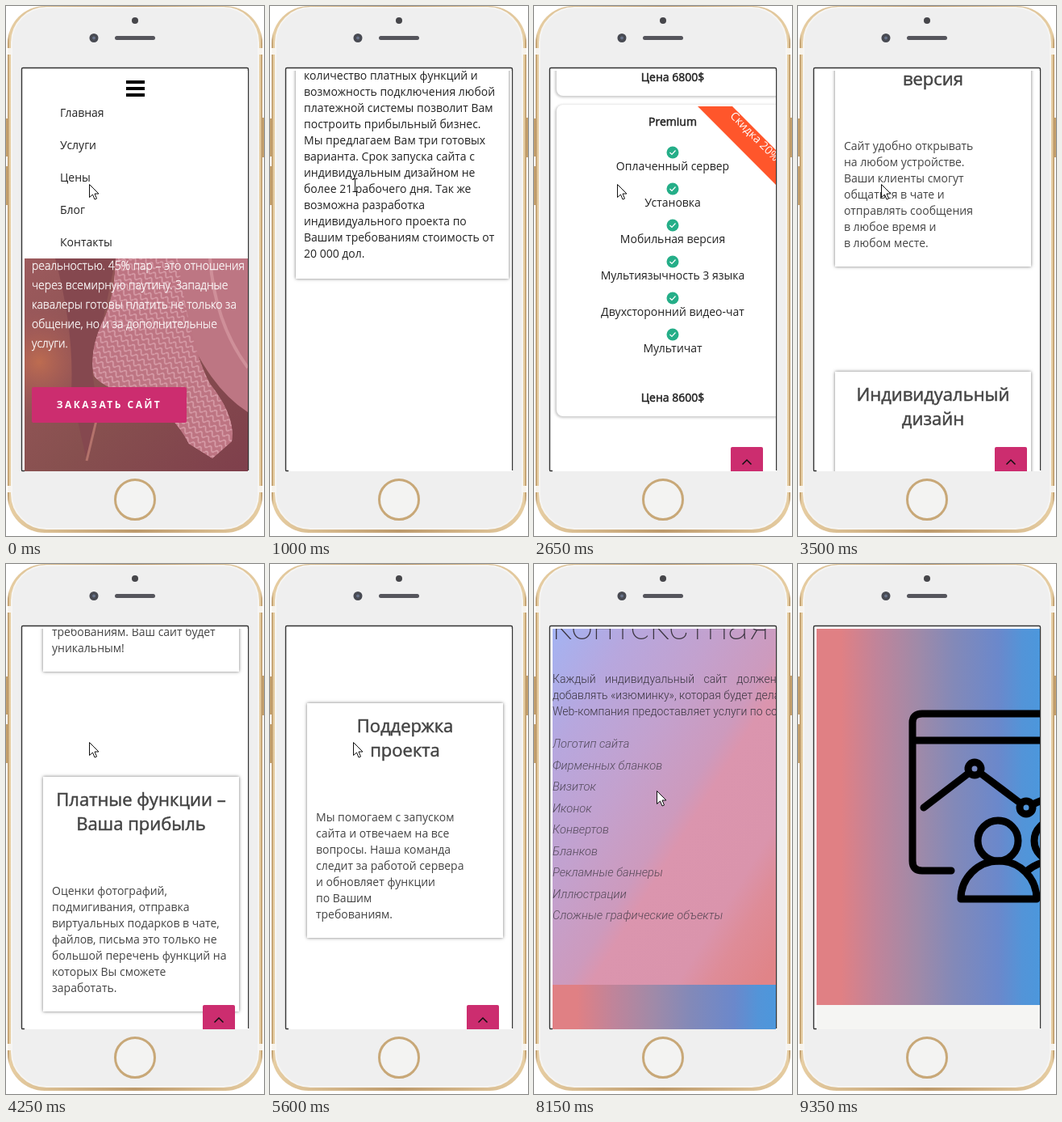
Animation of 320x655 px, one loop 9400 ms. Source, as an HTML page:

```html
<!DOCTYPE html>
<html lang="ru">
<head>
<meta charset="utf-8">
<style>
html, body { margin: 0; width: 100%; height: 100%; overflow: hidden; background: #fff; }
#stage { position: relative; width: 320px; height: 655px; overflow: hidden; }
#stage > svg { position: absolute; left: 0; top: 0; }
#screen { position: absolute; left: 23px; top: 80px; width: 277px; height: 495px; overflow: hidden; background: #fff; }
#screen div, #screen svg { position: absolute; }
.page { left: 0; top: 0; width: 277px; height: 5000px; font: 14px/20px "Open Sans", sans-serif; color: #222; }
.text { white-space: pre; }
.center { left: 0; width: 298px; text-align: center; }
.strong { -webkit-text-stroke: .5px; }
.hero { left: 9px; top: 229px; color: #fff; font-weight: 300; line-height: 24px; -webkit-text-stroke: .3px; }
.button { background: #cc2d6f; color: #fff; border-radius: 2px; text-align: center; }
.order { left: 9px; top: 391px; width: 192px; height: 44px; font: 700 12px/44px "Open Sans", sans-serif; letter-spacing: 2.5px; }
.box { background: #fff; box-shadow: 0 0 4px rgba(0,0,0,.55); }
.card { left: 5px; width: 288px; height: 385px; background: #fff; border-radius: 8px; box-shadow: -1px 1px 3px 1px #ccc; }
.card .center { left: -5px; }
.title { font-size: 22px; line-height: 30px; color: #444; }
.ribbon { left: 206px; top: 29px; width: 80px; text-align: center; color: #fff; transform: rotate(45deg); white-space: nowrap; }
.wide { left: 0; width: 277px; overflow: hidden; }
.cover { background: linear-gradient(122deg, #e0c4ff, #c8a6fa 262px, #a98af8 390px, #826cf8 490px); box-shadow: 0 1px 5px rgba(0,0,0,.5); z-index: 1; }
.story { font-family: Roboto, sans-serif; font-weight: 300; color: #3b3540;
  background: linear-gradient(122deg, #a2b4f4, #b7a7de 90px, #c3a1ce 180px, #cd9abd 255px, #db95ae 280px, #da94ac 370px, #de8c98 405px, #e08488 460px); }
.story .big { font-size: 48px; font-weight: 100; line-height: 48px; top: -14px; }
.story .list { font-size: 14.7px; font-style: italic; line-height: 26.5px; opacity: .8; }
.story .para { font-size: 14px; top: 65px; }
.spectrum { background: linear-gradient(90deg, #e08084 30px, #c0849a 75px, #a08aa8 125px, #8389b8 170px, #6b88cb 225px, #5394d8 255px, #4c97dc); }
.foot { background: #f5f5f3; }
</style>
</head>
<body>
<div id="stage">
  <svg width="320" height="655">
    <defs>
      <linearGradient id="gold"><stop stop-color="#b08a58"/><stop offset=".008" stop-color="#e6cda2"/><stop offset=".5" stop-color="#bd9a6c"/><stop offset=".992" stop-color="#e6cda2"/><stop offset="1" stop-color="#b08a58"/></linearGradient>
    </defs>
    <path d="M1.500 139V186M1.500 198V246M318.500 138V187" stroke="#c4a06c" stroke-width="3"/>
    <rect x="2" y="0" width="316" height="651" rx="46" fill="url(#gold)"/>
    <path d="M2 56H318M2 597H318" stroke="#f7f3ec" stroke-width="8"/>
    <rect x="7" y="2" width="306" height="644" rx="43" fill="#efefef" stroke="#f6f5f3" stroke-width="2"/>
    <circle cx="160" cy="18" r="4" fill="#46464a"/>
    <circle cx="109" cy="39.500" r="5.500" fill="#484a52"/>
    <circle cx="109" cy="39.500" r="2" fill="#68738a"/>
    <rect x="135" y="37" width="50" height="5" rx="2.500" fill="#55555c"/>
    <circle cx="160" cy="610" r="24.500" fill="#f3f3f2" stroke="#c8a878" stroke-width="3"/>
    <rect x="19" y="76" width="282" height="499" fill="#fff"/>
    <path d="M23 574.500H20Q19.500 574.500 19.500 573V78Q19.500 76.500 21 76.500H299Q300.500 76.500 300.500 78V574" fill="none" stroke="#333" stroke-width="1.400"/>
  </svg>
  <div id="screen">
    <div class="page" id="agency"></div>
    <div class="page" id="studio"></div>
    <div class="button" id="toTop" style="left:221px;top:465px;width:40px;height:40px"><svg style="left:13px;top:14px" width="14" height="9"><path d="M1.500 7.500L7 2L12.500 7.500" fill="none" stroke="#111" stroke-width="1.500"/></svg></div>
  </div>
  <svg width="320" height="655">
    <path id="arrow" d="M0 0V16L4 12.500L6.500 18.500L9 17.500L6.500 11.500H11.500Z" fill="#fff" stroke="#111"/>
    <path id="beam" d="M102.500 213.500H105L105.500 214L106 213.500H108.500M105.500 214V229M102.500 229.500H108.500" fill="none" stroke="#111"/>
  </svg>
</div>
<script>
const el = id => document.getElementById(id);
const text = (x, middle, value) =>
  `<div class="text" style="left:${x}px;top:${middle - 10}px">${value}</div>`;
const centered = (middle, value, cls = '') =>
  `<div class="text center ${cls}" style="top:${middle - 10}px">${value}</div>`;
const block = (cls, top, height, content = '') =>
  `<div class="${cls}" style="top:${top}px;height:${height}px">${content}</div>`;

const photo = `<svg width="277" height="308">
  <defs>
    <linearGradient id="dusk" x2="1" y2="1"><stop stop-color="#9c5a5d"/><stop offset=".5" stop-color="#87504f"/><stop offset="1" stop-color="#7d3c4b"/></linearGradient>
    <radialGradient id="glow"><stop stop-color="#bd6c50"/><stop offset="1" stop-color="#a4575a" stop-opacity="0"/></radialGradient>
    <pattern id="lace" width="10" height="8" patternUnits="userSpaceOnUse" patternTransform="rotate(35)"><path d="M0 4Q2.500 -1 5 4T10 4" fill="none" stroke="#dba3ae" stroke-width="1.600"/></pattern>
  </defs>
  <rect width="277" height="308" fill="url(#dusk)"/>
  <circle cx="18" cy="128" r="70" fill="url(#glow)"/>
  <path d="M38 0Q62 90 58 165L76 245L92 200L84 140L113 0Z" fill="#85484f"/>
  <path d="M185 0H277V190Q238 165 210 110Z" fill="#bd7683"/>
  <path d="M230 0Q236 80 277 135" fill="none" stroke="#cf8f99" stroke-width="4"/>
  <path id="sleeve" d="M113 0Q112 50 96 80Q80 115 86 145Q100 163 145 170Q185 192 204 229L233 247L257 226Q262 195 230 155Q206 112 190 0Z" fill="#bd7482"/>
  <use href="#sleeve" style="fill:url(#lace)"/>
  <path d="M113 0Q112 50 96 80Q80 115 86 145Q100 163 145 170Q185 192 204 229L233 247L257 226Q262 195 230 155Q206 112 190 0Z" fill="url(#lace)"/>
  <path d="M92 188L77 250" stroke="#b4736c" stroke-width="3"/>
</svg>`;

const tick = (x, y) => `<svg style="left:${x - 8}px;top:${y - 8}px" width="16" height="16"><circle cx="8" cy="8" r="7.500" fill="#25ae88"/><path d="M4.500 8L7 10.500L11.500 5.500" fill="none" stroke="#fff" stroke-width="1.200"/></svg>`;
const ribbon = `<svg style="left:175px;top:2px" width="113" height="120"><path d="M0 0H43L113 70V113Z" fill="#ff562b"/></svg><div class="ribbon">Скидка 20%</div>`;

const priceCard = (top, name, price, features, extra = '') => block('card', top, 385,
  centered(21, name, 'strong')
  + features.map((f, i) => tick(144, 59 + 45 * i) + centered(76 + 45 * i, f)).join('')
  + centered(362, `Цена ${price}$`, 'strong') + extra);

const feature = (top, heading, body) =>
  `<div class="box" style="left:23px;top:${top}px;width:243px;height:290px">
    <div class="text title strong" style="left:0;top:12px;width:243px;text-align:center">${heading}</div>
    <div class="text" style="left:11px;top:131px;color:#444">${body}</div></div>`;

const features = ['Оплаченный сервер', 'Установка', 'Мобильная версия',
  'Мультиязычность 3 языка', 'Двухсторонний видео-чат', 'Мультичат'];

const menu = ['Главная', 'Услуги', 'Цены', 'Блог', 'Контакты']
  .map((item, i) => text(44, 52 + 40 * i, item)).join('');
const burger = `<svg style="left:126px;top:12px" width="23" height="20"><path d="M0 2H23M0 10H23M0 18H23" stroke="#000" stroke-width="4"/></svg>`;

el('agency').innerHTML = burger + menu
  + block('wide', 232, 308, photo)
  + `<div class="text hero">реальностью. 45% пар – это отношения
через всемирную паутину. Западные
кавалеры готовы платить не только за
общение, но и за дополнительные
услуги.</div>`
  + '<div class="button order">ЗАКАЗАТЬ САЙТ</div>'
  + '<div class="box" style="left:9px;top:640px;width:264px;height:417px"></div>'
  + centered(668, 'Сайт знакомств', 'strong')
  + `<div class="text" style="left:19px;top:696px">Сайт знакомств – это удобный
способ начать своё дело в сети.
Готовое решение включает всё
необходимое для работы.
Большое
количество платных функций и
возможность подключения любой
платежной системы позволит Вам
построить прибыльный бизнес.
Мы предлагаем Вам три готовых
варианта. Срок запуска сайта с
индивидуальным дизайном не
более 21 рабочего дня. Так же
возможна разработка
индивидуального проекта по
Вашим требованиям стоимость от
20 000 дол.</div>`
  + centered(1322, 'Цены', 'title strong')
  + priceCard(1350, 'Standard', 5000, features.slice(0, 4))
  + priceCard(1746, 'Business', 6800, features.slice(0, 5))
  + priceCard(2142, 'Premium', 8600, features, ribbon)
  + feature(2743, 'Мобильная\nверсия', `Сайт удобно открывать
на любом устройстве.
Ваши клиенты смогут
общаться в чате и
отправлять сообщения
в любое время и
в любом месте.`)
  + feature(3163, 'Индивидуальный\nдизайн', `Мы создаём дизайн,
который подчеркнёт
особенности Вашего
проекта. Разработка
выполняется по Вашим
требованиям. Ваш сайт будет
уникальным!`)
  + feature(3583, 'Платные функции –\nВаша прибыль', `Оценки фотографий,
подмигивания, отправка
виртуальных подарков в чате,
файлов, письма это только не
большой перечень функций на
которых Вы сможете
заработать.`)
  + feature(4003, 'Удобное\nуправление', `Простая панель поможет
Вам следить за работой
сайта, добавлять новые
страницы и услуги,
отвечать на письма и
настраивать платные
функции.`)
  + feature(4423, 'Поддержка\nпроекта', `Мы помогаем с запуском
сайта и отвечаем на все
вопросы. Наша команда
следит за работой сервера
и обновляет функции
по Вашим
требованиям.`);

const story = (top, height, title, para, list, listTop) => block('wide story', top, height,
  `<div class="text big">${title}</div><div class="text para">${para}</div>`
  + `<div class="text list" style="top:${listTop}px">${list}</div>`);

const audienceIcon = `<svg width="277" height="495" viewBox="23 50 277 495"><g fill="none" stroke="#000" stroke-width="9" stroke-linecap="round" stroke-linejoin="round">
  <path d="M190 379H154Q142 379 142 367V196Q142 185 154 185H310M142 218H310M156 301L211 259M227 259L275 295M291 297L312 288"/>
  <circle cx="219" cy="253" r="8"/><circle cx="283" cy="301" r="8"/>
  <circle cx="248" cy="342" r="25"/><circle cx="318" cy="342" r="25"/>
  <path d="M202 414A47 47 0 0 1 296 414ZM283 380Q296 369 312 367"/></g></svg>`;

el('studio').innerHTML = block('wide cover', 0, 495)
  + story(495, 520, 'Landing page', 'Заказывая landing page у нас, Вы получаете:',
    `Неповторимый дизайн
Уникальный продающие тексты
Грамотною планировку Вашей рекламы
Кратчайшие сроки выполнения работ
Приемлемая цена за работу`, 101)
  + block('wide spectrum', 1015, 495)
  + story(1510, 453, 'контекстная реклама',
    `<span style="word-spacing:8px">Каждый индивидуальный сайт должен</span>
добавлять «изюминку», которая будет делать
Web-компания предоставляет услуги по созданию`,
    `Логотип сайта
Фирменных бланков
Визиток
Иконок
Конвертов
Бланков
Рекламные баннеры
Иллюстрации
Сложные графические объекты`, 142)
  + block('wide spectrum', 1963, 495, audienceIcon)
  + block('wide foot', 2458, 500);

const LOOP = 9400, SWITCH = 5700;
const agencyScroll = [[0, 0], [1000, 800], [2650, 2100], [4250, 3400], [SWITCH, 4400]];
const studioScroll = [[SWITCH, 0], [6750, 472], [8150, 1523], [9350, 1993]];

function along(keys, time) {
  const i = Math.max(1, keys.findIndex(k => k[0] >= time));
  const [t0, y0] = keys[i - 1], [t1, y1] = keys[i];
  return Math.round(y0 + (y1 - y0) * (time - t0) / (t1 - t0));
}
const show = (id, on) => el(id).style.display = on ? '' : 'none';

function draw(now) {
  const time = Math.floor(now % LOOP / 50) * 50;
  const first = time < SWITCH;
  const reading = time >= 700 && time < 1300;
  show('agency', first);
  show('studio', !first);
  show('toTop', first && time >= 1500);
  show('beam', reading);
  show('arrow', !reading && time < 9200);
  const page = first ? 'agency' : 'studio';
  el(page).style.top = -along(first ? agencyScroll : studioScroll, time) + 'px';
  el('arrow').setAttribute('transform', first ? 'translate(103.5 220.5)' : 'translate(152.5 280.5)');
}
const start = performance.now();
function loop(now) {
  draw(Math.max(0, now - start));
  requestAnimationFrame(loop);
}
draw(0);
requestAnimationFrame(loop);
</script>
</body>
</html>
```
